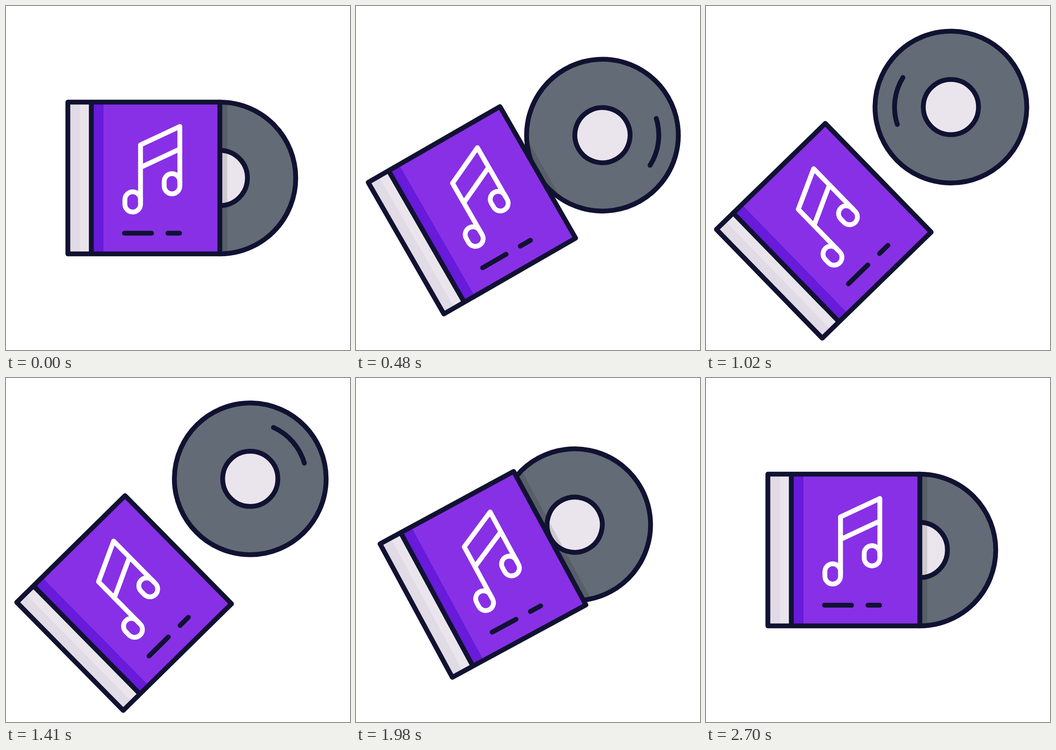
These frames come from a looping animation (748x748 px, 4.73 s). An HTML page:

```html
<!DOCTYPE html>
<html lang="en">
<head>
<meta charset="utf-8">
<title>Music album</title>
<style>
  html, body { margin: 0; height: 100%; overflow: hidden; background: #fff; }
  svg { display: block; width: 100%; height: 100%; }
  .line { fill: none; stroke: #111232; stroke-width: 10.5; stroke-linecap: round; stroke-linejoin: round; }
  .note { stroke: #fff; }
</style>
</head>
<body>
<svg viewBox="0 0 748 748">
  <clipPath id="round"><circle r="165"/></clipPath>
  <g id="album">
    <g id="disc">
      <circle r="165" fill="#636c76"/>
      <circle r="60" fill="#eae5ec"/>
      <g clip-path="url(#round)">
        <rect id="shade" y="-170" width="16" height="340" opacity=".12"/>
      </g>
      <circle class="line" r="165"/>
      <circle class="line" r="60"/>
      <path id="shine" class="line" d="M111.2-51.4A122.5 122.5 0 0 1 111.2 51.4"/>
    </g>
    <g id="box">
      <path fill="#e1dbe6" d="M134.5 209h27v330h-27z"/>
      <path fill="#eae5ec" d="M161 209h25v330h-25z"/>
      <path fill="#681bda" d="M185.5 209h27v330h-27z"/>
      <path fill="#8830e6" d="M212 209h253v330H212z"/>
      <path class="line" d="M134.5 209H465v330H134.5zM185.5 209v330"/>
      <path class="line" d="M257.5 494h59M352 494h25.5"/>
      <g class="line note">
        <path d="M292.5 426V302L378 262V386M292.5 351L378 311"/>
        <rect x="258.5" y="404" width="34" height="44" rx="17"/>
        <rect x="344" y="364.5" width="34" height="44" rx="17"/>
      </g>
    </g>
  </g>
</svg>
<script>
const LOOP = 4730, STEP = 30, OPEN = 1245, REST = 2700;

// Same curve as CSS cubic-bezier(x1, 0, x2, 1)
function ease(x, x1, x2) {
  let low = 0, high = 1, s;
  for (let i = 0; i < 24; i++) {
    s = (low + high) / 2;
    const r = 1 - s;
    if (3 * s * r * (x1 * r + x2 * s) + s ** 3 < x) low = s; else high = s;
  }
  return s * s * (3 - 2 * s);
}

// Eased legs from rest: out to a peak, back past or near rest, then settle
function swing(peak, dip) {
  const legs = [peak, dip, { to: 0, end: REST, x1: .35, x2: .65 }];
  return time => {
    let from = 0, start = 0;
    for (const { to, end, x1, x2 } of legs) {
      if (time < end) return from + (to - from) * ease((time - start) / (end - start), x1, x2);
      from = to;
      start = end;
    }
    return from;
  };
}

const tilt = swing({ to: 45, end: OPEN, x1: .33, x2: .15 }, { to: -3.9, end: 2310, x1: 1, x2: .7 });
const boxShift = swing({ to: -91.5, end: OPEN, x1: .35, x2: .05 }, { to: -20.8, end: 2190, x1: .77, x2: .67 });
const discShift = swing({ to: 132, end: OPEN, x1: .35, x2: .05 }, { to: -45, end: 2220, x1: .88, x2: .69 });
const spin = time => 192 + 415 * Math.sin((time - 1035) / 1205);

const move = (id, value) => document.getElementById(id).setAttribute('transform', value);

function draw(t) {
  const angle = tilt(t), box = boxShift(t), disc = discShift(t);
  move('album', `rotate(${-angle} 374 374)`);
  move('box', `translate(${box})`);
  move('disc', `translate(${465 + disc} 374)`);
  move('shade', `translate(${box - disc})`);
  move('shine', `rotate(${spin(t) + angle})`);
}

const start = performance.now();
function frame() {
  const t = (performance.now() - start) % LOOP;
  draw(Math.min(Math.floor(t / STEP) * STEP, REST));
  requestAnimationFrame(frame);
}
frame();
</script>
</body>
</html>
```
